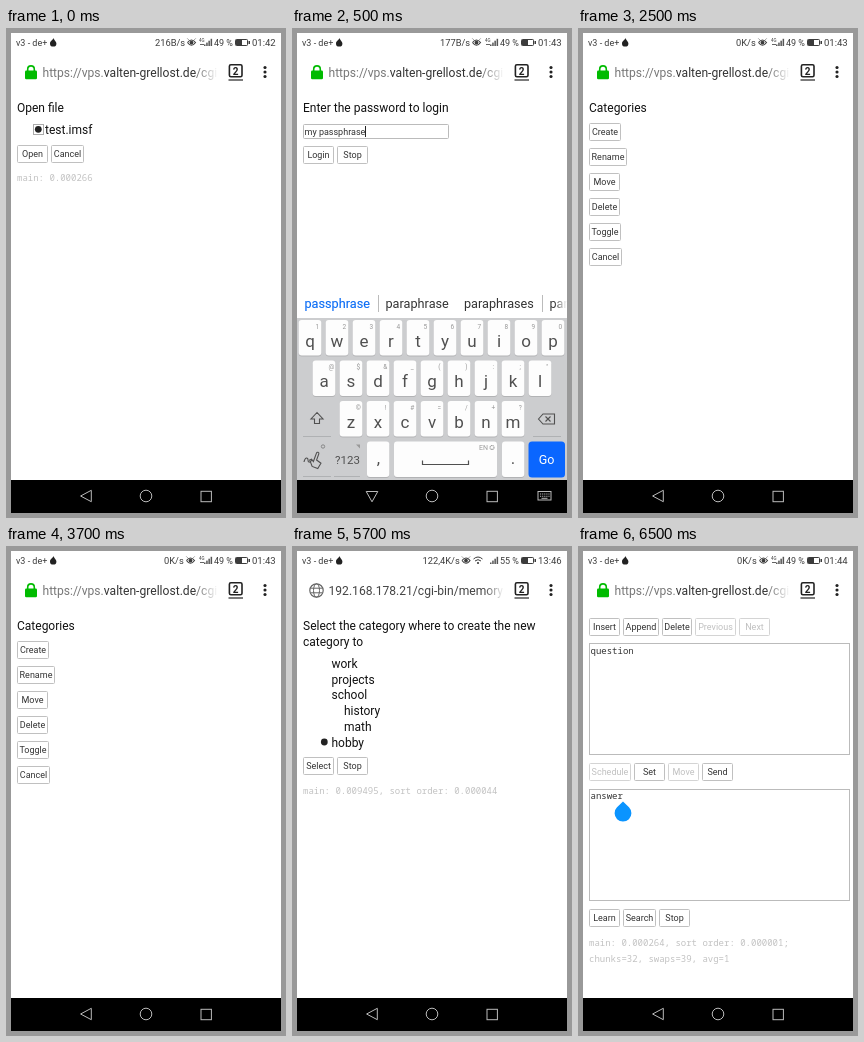
Write an HTML page that moves like this. It is 280 px wide and 490 px high and loops after 8 s.

```html
<!DOCTYPE html>
<html lang="en">
<head>
<meta charset="utf-8">
<title>Phone screens</title>
<style>
html, body { margin: 0; width: 100%; height: 100%; overflow: hidden; background: #999; }
svg { display: block; width: 280px; height: 490px; font-family: Roboto, sans-serif; }
text { white-space: pre; }
#strip { animation: screens 8s step-end infinite; }
.mono { font-family: "Noto Sans Mono", "DejaVu Sans Mono", monospace; }
@keyframes screens {
  0% { transform: translateX(0); }
  6.25% { transform: translateX(-280px); }
  31.25% { transform: translateX(-560px); }
  56.25% { transform: translateX(-840px); }
  81.25%, 100% { transform: translateX(-1120px); }
}
</style>
</head>
<body>
<svg viewBox="0 0 280 490">
  <defs>
    <linearGradient id="fade">
      <stop offset="0" stop-color="#fff" stop-opacity="0"/>
      <stop offset="1" stop-color="#fff"/>
    </linearGradient>
  </defs>
  <g id="strip"></g>
  <path d="M0 0H280V490H0ZM5 5V485H275V5Z" fill="#999" fill-rule="evenodd"/>
</svg>
<script>
const text = (x, y, str, size = 12, fill = '#111', more = '') =>
  `<text x="${x}" y="${y}" font-size="${size}" fill="${fill}" ${more}>${str}</text>`;
const mid = (x, y, str, size, fill, more = '') =>
  text(x, y, str, size, fill, 'text-anchor="middle" ' + more);
const mono = (x, y, str, fill = '#c2c2c2') => text(x, y, str, 9, fill, 'class="mono"');
const rect = (x, y, w, h, fill, more = '') =>
  `<rect x="${x}" y="${y}" width="${w}" height="${h}" fill="${fill}" ${more}/>`;
const circle = (x, y, r, fill, more = '') =>
  `<circle cx="${x}" cy="${y}" r="${r}" fill="${fill}" ${more}/>`;
const line = (d, stroke, width = 1, more = '') =>
  `<path d="${d}" fill="none" stroke="${stroke}" stroke-width="${width}" ${more}/>`;
const shape = (d, fill) => `<path d="${d}" fill="${fill}"/>`;

const box = (x1, y1, x2, y2, stroke = '#bbb', r = 1) =>
  rect(x1 + .5, y1 + .5, x2 - x1 - 1, y2 - y1 - 1, '#fff', `rx="${r}" stroke="${stroke}"`);
const button = (x1, x2, y, label, off) =>
  box(x1, y, x2, y + 18, off ? '#d4d4d4' : '#c0c0c0') +
  mid((x1 + x2) / 2, y + 12.2, label, 9, off ? '#c0c0c0' : '#333');

function statusBar({ rate, rateX, eyeX, wifi, charge, time }) {
  const ink = '#3c3c3c';
  let s = text(10, 18, 'v3 - de+', 9, ink) + text(rateX, 18, rate, 9.3, ink);
  s += shape('M47.5 10C47 12 44 13 44 15.4A3.2 3.2 0 0 0 50.4 15.4C50.4 13.5 48.5 13 47.5 10Z', '#222');
  s += line(`M${eyeX - 4} 14.5Q${eyeX} 9.5 ${eyeX + 4} 14.5Q${eyeX} 20 ${eyeX - 4} 14.5`, ink, 1.2);
  s += circle(eyeX, 14.6, 1.9, ink) + line(`M${eyeX - 3} 11.6l-1-1M${eyeX + 3} 11.6l1-1`, ink, .8);
  if (wifi) {
    s += line('M181.5 13Q186 9 190.5 13M183 15Q186 12.3 189 15', ink, 1) + circle(186, 17, 1.1, ink);
  } else {
    s += text(193, 13.5, '4G', 4.5, ink) + line('M194 16.5h4', ink, .8);
  }
  for (let i = 0; i < 4; i++) s += rect(198 + i * 2.2, 16.5 - i * 1.9, 1.5, 1.5 + i * 1.9, '#555');
  s += text(208, 17.5, charge + ' %', 9, ink);
  s += rect(229.5, 11.5, 12, 6, 'none', `stroke="${ink}" rx=".8"`) + rect(230, 12, 6, 5, ink) + rect(242.5, 13, 1.5, 3, ink);
  return s + text(246, 18, time, 9.5, ink);
}

function addressBar(local) {
  let s;
  if (local) {
    s = circle(24.5, 44.5, 6.7, 'none', 'stroke="#666" stroke-width="1.2"') +
      '<ellipse cx="24.5" cy="44.5" rx="3" ry="6.7" fill="none" stroke="#666"/>' +
      line('M18.5 42.2h12M18.5 46.8h12', '#666') +
      text(36.5, 48.5, '192.168.178.21/cgi-bin/memorys', 12.1, '#444');
  } else {
    s = rect(19, 42.5, 12, 8.7, '#0b0', 'rx="1.2"') +
      line('M21.7 43V41.2a3.3 3.3 0 0 1 6.6 0V43', '#0b0', 1.6) +
      text(36.5, 48.5, 'https://vps.<tspan fill="#333">valten-grellost.de</tspan>/cgi', 12.1, '#777');
  }
  s += rect(192, 35, 20, 20, 'url(#fade)') + rect(212, 35, 10, 20, '#fff');
  s += rect(223.4, 36.8, 12.6, 12, '#fff', 'stroke="#222" stroke-width="1.6" rx="1.5"');
  s += line('M222.5 52h14.5', '#222', 1.2) + mid(229.7, 46.5, '2', 10, '#222', 'font-weight="700"');
  for (const y of [39.5, 44, 48.5]) s += circle(259, y, 1.55, '#222');
  return s;
}

function navBar(typing) {
  let s = rect(5, 452, 270, 33, '#000');
  s += line(typing ? 'M74.2 463.5H85.8L80 473.8Z' : 'M85.3 462.3V473.7L74.6 468Z', '#bbb');
  s += circle(140, 468, 5.8, 'none', 'stroke="#bbb"');
  s += rect(195, 463.3, 10.4, 10.4, 'none', 'stroke="#bbb"');
  if (typing) {
    s += rect(246, 463.5, 13, 8.5, 'none', 'stroke="#bbb"');
    s += line('M248 466h9.5M248 468.2h9.5', '#bbb', 1.1, 'stroke-dasharray="1.2 .9"') + line('M249.5 470.3h6', '#bbb', 1);
  }
  return s;
}

function keyboard() {
  const ink = '#505050', blue = '#0a6cf5';
  let s = text(12.5, 280, 'passphrase', 12.7, blue, `stroke="${blue}" stroke-width=".15"`);
  s += text(93.5, 280, 'paraphrase', 12.7, '#333') + text(172, 280, 'paraphrases', 12.7, '#333');
  s += text(257.5, 280, 'par', 12.7, '#333') + rect(262, 266, 13, 20, 'url(#fade)');
  s += line('M86.5 267v17M250.5 267v17', '#bbb');
  s += rect(5, 290, 270, 162, '#cccdcf');
  const key = (x, y, w) => rect(x, y + 1, w, 35.5, '#b2b3b5', 'rx="3"') + rect(x, y, w, 35.5, '#fdfdfd', 'rx="3"');
  const rows = [
    ['qwertyuiop', '1234567890', 18, 292],
    ['asdfghjkl', '@$&_():;"', 32, 332.5],
    ['zxcvbnm', '©!#=/+?', 59, 373]
  ];
  for (const [letters, hints, x0, y] of rows) {
    [...letters].forEach((c, i) => {
      const x = x0 + i * 27, hint = hints[i].replace('&', '&amp;');
      s += key(x - 11.3, y, 22.6) + mid(x, y + 26.5, c, 17, ink) + mid(x + 7.3, y + 8.5, hint, 6.5, '#999');
    });
  }
  s += line('M25 384.5l-6 6.5h3.5v4.5h5V391h3.5Z', ink, 1.1);
  s += line('M246.5 391l4.5-5h11.5v10H251ZM253.5 388.5l5 5M258.5 388.5l-5 5', ink, 1.1);
  s += line('M11 408.5h28M241 408.5h28M11 448.5h28M42 448.5h26', '#a9aaac', .8);

  s += line('M12 434c1-5 4-5 4-2s2 3 4 0', ink, 1.1);
  s += line('M22 425v9l-2.5-1.5-1.5 1.3 4.5 5.2h6l1.2-6-5.2-1.5V425a1.2 1.2 0 0 0-2.5 0Z', ink, 1.1, 'transform="rotate(20 23 432)"');
  s += circle(31, 418.5, 1.7, 'none', 'stroke="#777" stroke-width=".8"');
  s += mid(55.5, 435.8, '?123', 11.5, ink) + shape('M64 416.5h4v4Z', '#999');
  s += key(75, 413.5, 22.3) + mid(86.5, 435.5, ',', 17, ink);
  s += key(102, 413.5, 103) + line('M130.5 432.5v4h46v-4', ink, 1.2);
  s += text(187, 422, 'EN', 7, '#999') + circle(200, 419.5, 2, 'none', 'stroke="#999" stroke-width="1.1" stroke-dasharray="1.1 .4"');
  s += key(210, 413.5, 22.3) + mid(221, 435.5, '.', 17, ink);
  s += rect(236.5, 413.5, 36.5, 36, '#0a66ff', 'rx="3.5"') + mid(254.7, 435.7, 'Go', 12.5, '#fff');
  return s;
}

const radio = y => circle(32.3, y, 3.4, '#222');

const openFile = () => text(11, 84, 'Open file') +
  rect(27.5, 96.5, 10, 10, 'none', 'stroke="#555" stroke-dasharray="1 1"') + radio(101.3) +
  text(39, 106, 'test.imsf') + button(11, 42, 117, 'Open') + button(45, 78, 117, 'Cancel') +
  mono(11, 153, 'main: 0.000266');

const login = () => text(11, 84, 'Enter the password to login') +
  box(11, 96, 157, 111) + text(12.5, 107, 'my passphrase', 9, '#333') + line('M73.5 98v11', '#222') +
  button(11, 42, 118, 'Login') + button(45, 76, 118, 'Stop') + keyboard();

const categories = () => text(11, 84, 'Categories') +
  [['Create', 43], ['Rename', 49], ['Move', 42], ['Delete', 42], ['Toggle', 43], ['Cancel', 44]]
    .map(([label, end], i) => button(11, end, 95 + 25 * i, label)).join('');

const choose = () => text(11, 84, 'Select the category where to create the new') + text(11, 100, 'category to') +
  ['work', 'projects', 'school', 'history', 'math', 'hobby']
    .map((name, i) => text(i === 3 || i === 4 ? 52 : 39.5, 122 + 15.7 * i, name)).join('') +
  radio(196) + button(11, 42, 211, 'Select') + button(45, 76, 211, 'Stop') +
  mono(11, 248, 'main: 0.009495, sort order: 0.000044');

const editor = () => button(11, 42, 72, 'Insert') + button(45, 81, 72, 'Append') + button(84, 114, 72, 'Delete') +
  button(117, 158, 72, 'Previous', true) + button(161, 192, 72, 'Next', true) +
  box(11, 97, 272, 209, '#bbb', 0) + mono(12.5, 108, 'question', '#333') +
  button(11, 53, 217, 'Schedule', true) + button(56, 87, 217, 'Set') +
  button(90, 121, 217, 'Move', true) + button(124, 155, 217, 'Send') +
  box(11, 243, 272, 355, '#bbb', 0) + mono(12.5, 253.4, 'answer', '#333') +
  shape('M45 255.5L51 261.3A8.4 8.4 0 1 1 39 261.3Z', '#0a94ff') +
  button(11, 42, 363, 'Learn') + button(45, 78, 363, 'Search') + button(81, 112, 363, 'Stop') +
  mono(11, 400, 'main: 0.000264, sort order: 0.000001;') + mono(11, 415.5, 'chunks=32, swaps=39, avg=1');

const night = (rate, rateX, time, eyeX = 184.5) => ({ rate, rateX, eyeX, charge: 49, time });
const screens = [
  [openFile, night('216B/s', 149, '01:42', 185.5)],
  [login, night('177B/s', 148, '01:43')],
  [categories, night('0K/s', 158, '01:43')],
  [choose, { rate: '122,4K/s', rateX: 130.5, eyeX: 174, wifi: true, charge: 55, time: '13:46' }],
  [editor, night('0K/s', 159, '01:44', 185.5)]
];
document.getElementById('strip').innerHTML = screens.map(([page, status], i) =>
  `<g transform="translate(${280 * i})">` + rect(0, 0, 280, 490, '#fff') +
  statusBar(status) + addressBar(page === choose) + page() + navBar(page === login) + '</g>').join('');
</script>
</body>
</html>
```
